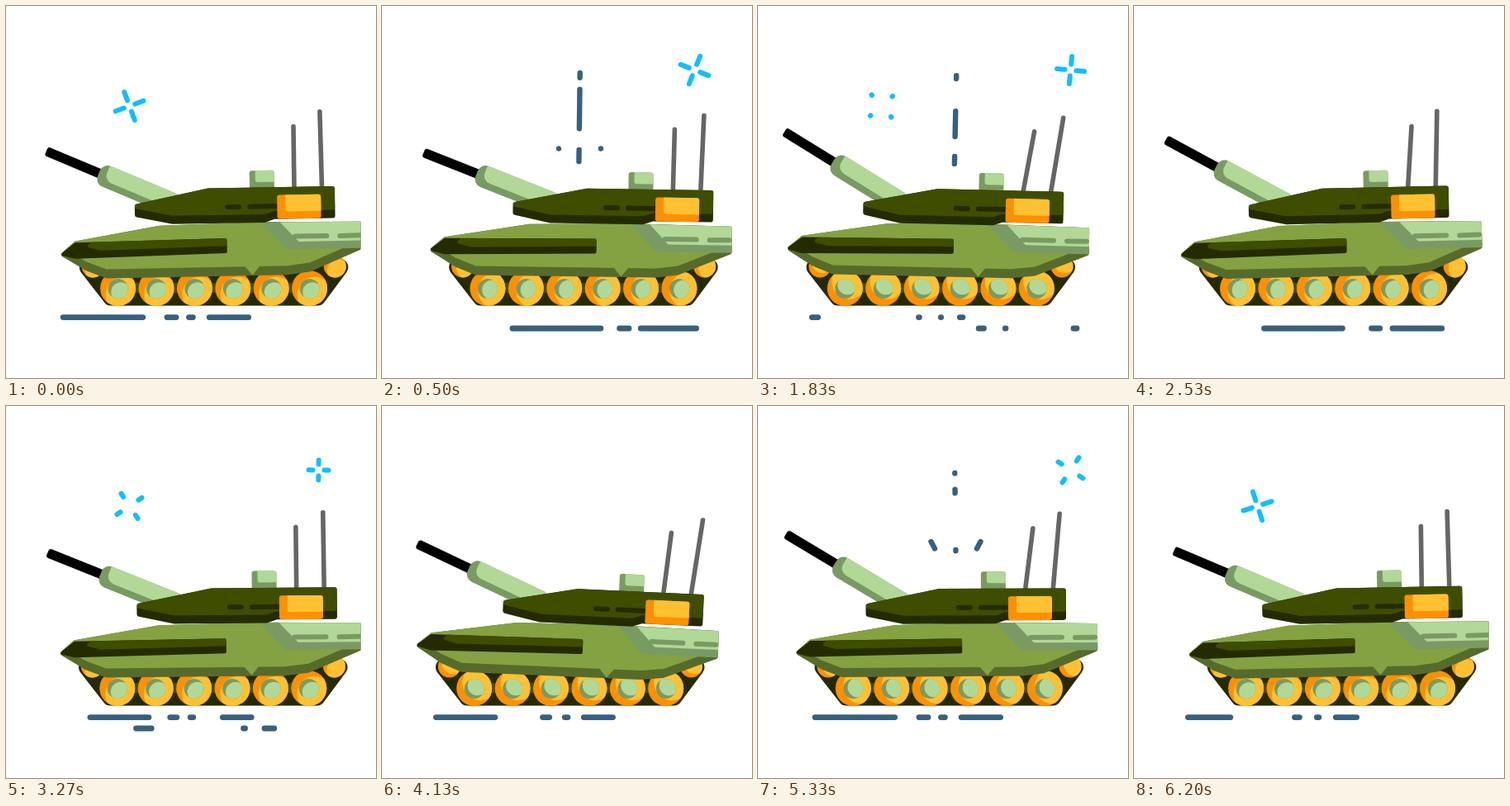
Animation, 448 px wide and 450 px high, one loop 6230 ms. Source, as an HTML page with a canvas:

```html
<!DOCTYPE html>
<html>
<head>
<meta charset="utf-8">
<title>Tank</title>
<style>
html, body { margin: 0; width: 100%; height: 100%; overflow: hidden; background: #fff; }
canvas { display: block; }
</style>
</head>
<body>
<canvas id="stage" width="448" height="450"></canvas>
<script>
const ctx = document.getElementById('stage').getContext('2d');
const LOOP = 6230, FRAMES = 187, SWING = LOOP / 2, RAD = Math.PI / 180;
const C = {
  dark: '#3e4d00', black: '#242b00', hull: '#84a242', skirt: '#566b2b',
  light: '#b2d898', shade: '#7a9a63', orange: '#ff9000', yellow: '#ffc131',
  sky: '#10bfff', slate: '#38607f', grey: '#666'
};

const clamp = v => Math.max(0, Math.min(1, v));
const smooth = v => { v = clamp(v); return v * v * (3 - 2 * v); };
const easeIn = v => clamp(v) ** 2;
const easeOut = (v, n = 2) => 1 - (1 - clamp(v)) ** n;
const mix = (a, b, k) => a + (b - a) * k;
const wave = (t, peak) => Math.cos(2 * Math.PI * (t - peak) / SWING);

// Polygon with rounded corners
function shape(r, ...pts) {
  const path = new Path2D();
  const [a, b] = [pts[0], pts[pts.length - 1]];
  path.moveTo((a[0] + b[0]) / 2, (a[1] + b[1]) / 2);
  pts.forEach((p, i) => path.arcTo(...p, ...pts[(i + 1) % pts.length], r));
  path.closePath();
  return path;
}

function box(x, y, w, h, r) {
  const path = new Path2D();
  path.roundRect(x, y, w, h, r);
  return path;
}

function circle(x, y, r) {
  const path = new Path2D();
  path.arc(x, y, r, 0, 7);
  return path;
}

function fill(path, color) {
  ctx.fillStyle = color;
  ctx.fill(path);
}

// Shape in its shade colour, covered by a moved copy of itself
function shaded(path, base, top, dx, dy) {
  ctx.save();
  fill(path, base);
  ctx.clip(path);
  ctx.translate(dx, dy);
  fill(path, top);
  ctx.restore();
}

function line(color, width, x1, y1, x2, y2) {
  ctx.strokeStyle = color;
  ctx.lineWidth = width;
  ctx.lineCap = 'round';
  ctx.beginPath();
  ctx.moveTo(x1, y1);
  ctx.lineTo(x2 + 0.01, y2);
  ctx.stroke();
}

// Part of a line between fractions a and b
function trim(width, x1, y1, x2, y2, a, b) {
  if (b > a) line(C.slate, width, mix(x1, x2, a), mix(y1, y2, a), mix(x1, x2, b), mix(y1, y2, b));
}

// Draws around a pivot that is placed at (x, y) and turned
function pose(x, y, deg, draw, px = 0, py = 0) {
  ctx.save();
  ctx.translate(x, y);
  ctx.rotate(deg * RAD);
  ctx.translate(-px, -py);
  draw();
  ctx.restore();
}

function star(x, y, u, dir) {
  if (u <= 0 || u > 0.87) return;
  const outer = 7 + 11 * easeOut(u / 0.45, 3);
  const inner = 7 + 10.5 * smooth((u - 0.45) / 0.4);
  for (let i = 0; i < 4; i++)
    pose(x, y, dir * 45 * smooth(u) + 90 * i, () => line(C.sky, 6, 0, -inner, 0, -Math.max(inner, outer)));
}

function ground(f) {
  const row = (y, a, b, ...parts) => parts.forEach(([x1, x2]) => trim(6.8, x1, y, x2, y, a, b));
  const p = f % 32, q = (p + 9.5) % 32;
  row(376.6, easeIn((q - 8.5) / 5.5), easeOut(q / 13.3), [65.3, 174.5], [194.5, 207], [221.3, 226.8], [244.3, 298]);
  row(390, easeIn((p - 14.5) / 8.7), easeOut((p - 0.5) / 20), [157.5, 273.5], [287.5, 300], [313, 386]);
}

function smoke(p, tilt) {
  const a = easeIn((p - 11.5) / 8.6), b = easeOut((p - 5) / 10);
  const c = smooth((p - 20) / 5), d = smooth((p - 15) / 5);
  pose(239, 140, tilt, () => {
    for (const [y1, y2] of [[51, 34], [18, -39], [-52, -59]]) trim(6.4, 0, y1, 0, y2, a, b);
  });
  for (const s of [-1, 1]) trim(6.4, 239.5 + s * 25.5, 172.5, 239.5 + s * 30, 164, c, d);
}

function wheel(x, y, r, turn, base, top) {
  const dx = -Math.cos(turn * RAD), dy = Math.sin(turn * RAD);
  shaded(circle(x, y, r), base, top, dx * r * 0.46, dy * r * 0.46);
}

const belt = shape(10, [58, 306], [102, 362.5], [362, 362.5], [404, 306]);

function tracks(turn) {
  fill(belt, C.black);
  fill(box(97, 335, 270, 12, 0), C.dark);
  for (const x of [85, 378]) wheel(x, 315, 13.5, turn, C.orange, C.yellow);
  for (let i = 0; i < 6; i++) {
    const x = 115.3 + 46.4 * i;
    wheel(x, 341.5, 21.5, turn, C.orange, C.yellow);
    wheel(x, 342, 12, turn, C.shade, C.light);
  }
}

const body = shape(3, [43, 296], [62, 280], [165, 264], [287, 263], [410, 266],
  [410, 299], [345, 325], [318, 328], [100, 326], [75, 316]);
const armour = shape(2, [43, 296], [62, 281.5], [246, 281.5], [246, 299.5], [62, 301]);
const rear = shape(1, [287, 263.5], [410, 266], [410, 298], [318, 297]);
const notch = shape(1, [266, 315], [286, 315], [276, 327]);

function hull() {
  shaded(body, C.skirt, C.hull, 0, -11);
  fill(notch, C.hull);
  shaded(armour, C.black, C.dark, 32, -9);
  shaded(rear, C.shade, C.light, 15, -9);
  line(C.shade, 6, 329, 281.5, 367, 282);
  line(C.shade, 6, 383, 282.5, 407, 282.5);
}

function gun() {
  fill(box(-161, -5.8, 80, 11.6, 3), '#000');
  shaded(box(-92, -13.5, 105, 27, 10), C.shade, C.light, 9, -8);
}

const dome = shape(3, [130.5, 239], [220, 221], [373, 221], [373, 259.5], [300, 259.5],
  [288, 263.5], [176, 263.5], [130.5, 254]);

function turret(t, tilt) {
  for (let i = 0; i < 2; i++) {
    const lean = 5.2 - 0.4 * i + (6 + 0.6 * i) * wave(t, 1600 - 150 * i);
    pose(324 + 33.5 * i, 220, lean - tilt, () => line(C.grey, 5.6, 0, 0, 0, -72 - 17.5 * i));
  }
  pose(172, 237.5, 26.6 - 5.2 * wave(t, 370) - tilt, gun);
  shaded(box(270, 200.5, 30, 24, 3), C.shade, C.light, 7, -10);
  shaded(dome, C.black, C.dark, 0, -10);
  line(C.black, 6, 243, 244, 257, 244);
  line(C.black, 6, 270, 244, 305, 244);
  shaded(box(303, 230.5, 53, 29, 3), C.orange, C.yellow, 10, -9);
}

function draw(t) {
  const f = t / LOOP * FRAMES, beat = FRAMES / 4, puff = f % beat;
  const dx = 20.3 - 16.35 * (1 - wave(t, 0));
  const tilt = 2.12 * wave(t, 1221), top = tilt + 0.65;

  ctx.clearRect(0, 0, 448, 450);
  ground(f);
  smoke(puff, tilt * 1.2 + 0.4);
  star(149.5, 121, ((puff + 10.8) % beat) / 23, -1);
  star(378.5, 77.5, (puff - 2.6) / 25.6, 1);

  ctx.save();
  ctx.clip(box(0, 0, 429.5, 450, 0));
  pose(dx, 0, 0, () => tracks(190 - 60 * wave(t, -60)));
  pose(227 + dx, 281, tilt, hull, 226, 281);
  pose(264.8 + 16.1 * wave(t, 335), 245.3 + 1.5 * wave(t, 1300), top, () => turret(t, top), 252, 245);
  ctx.restore();
}

const start = performance.now();
function tick() {
  draw((performance.now() - start) % LOOP);
  requestAnimationFrame(tick);
}
tick();
</script>
</body>
</html>
```
